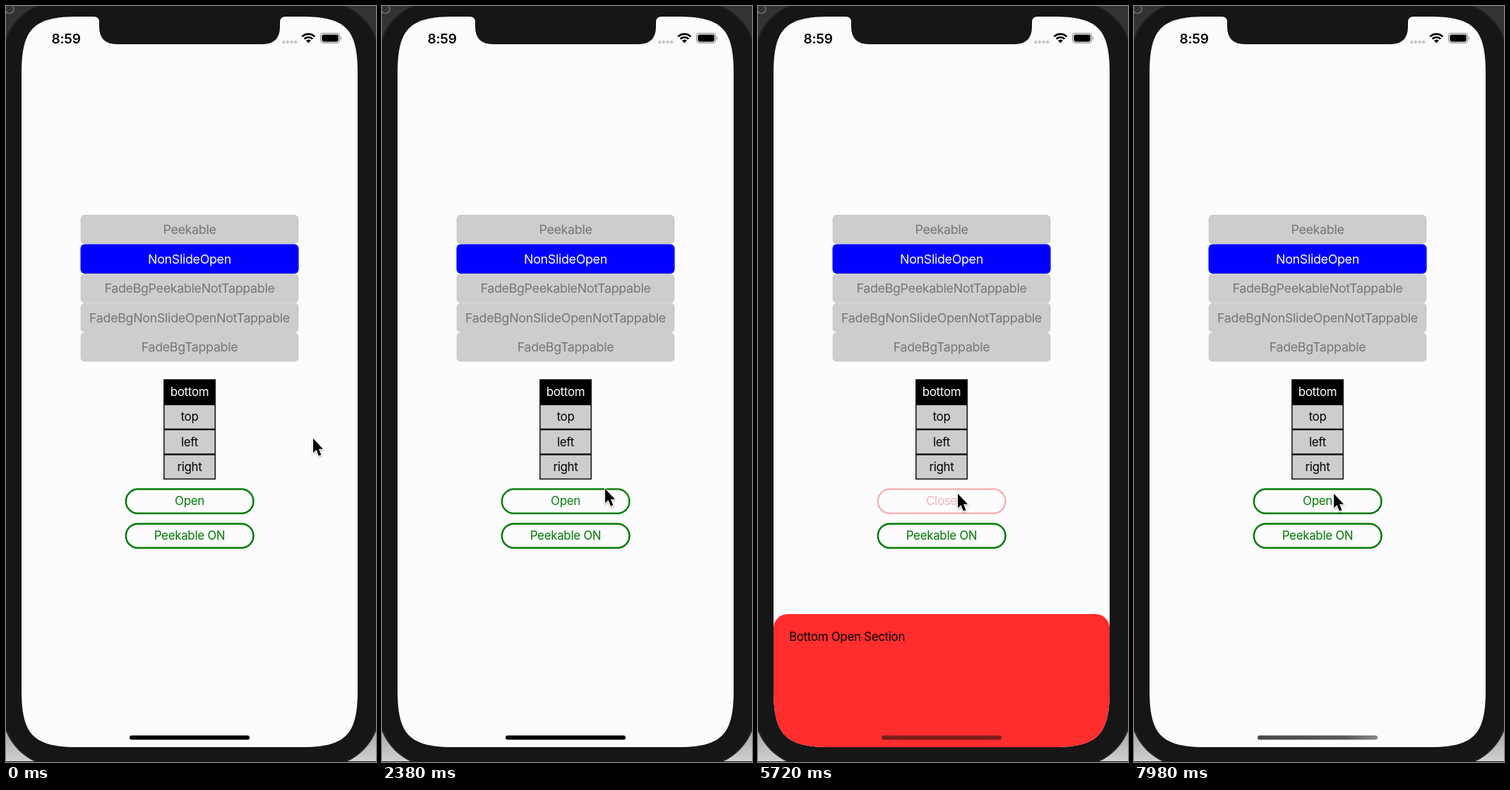
Animation, 524 px wide and 1068 px high, one loop 8 s. Source, as an HTML page:

```html
<!DOCTYPE html>
<html lang="en">
<head>
<meta charset="utf-8">
<title>Sliding panel demo</title>
<style>
  html, body { margin: 0; width: 100%; height: 100%; overflow: hidden; background: #161616; }
  svg { display: block; width: 524px; height: 1068px; font-family: Inter, Roboto, sans-serif; }
  .list { font-size: 17.8px; letter-spacing: -.28px; text-anchor: middle; }
  .small { font-size: 16.9px; letter-spacing: -.29px; }
  .mid { text-anchor: middle; }
  .clock { font-size: 19px; font-weight: 600; letter-spacing: -.2px; }
</style>
</head>
<body>
<svg viewBox="0 0 524 1068">
  <defs>
    <path id="screen" d="M22 95C22 32 39 15 102 15H418C481 15 498 32 498 95V967C498 1030 481 1047 418 1047H102C39 1047 22 1030 22 967Z"/>
    <clipPath id="clip"><use href="#screen"/></clipPath>
    <linearGradient id="desk" x2="0" y2="1">
      <stop offset="0" stop-color="#8e8e8e"/>
      <stop offset="1" stop-color="#d2d2d2"/>
    </linearGradient>
    <linearGradient id="fade">
      <stop offset="0" stop-color="#484848"/>
      <stop offset=".75" stop-color="#5a5a5a"/>
      <stop offset="1" stop-color="#888"/>
    </linearGradient>
    <filter id="shadow" x="-50%" y="-50%" width="200%" height="200%">
      <feDropShadow dx="0" dy="1.5" stdDeviation="1.3" flood-opacity=".35"/>
    </filter>
  </defs>

  <!-- desktop and phone body -->
  <rect width="524" height="534" fill="#333335"/>
  <rect y="1000" width="524" height="68" fill="url(#desk)"/>
  <path d="M10 1A6 6 0 1 1 0 1" fill="none" stroke="#777" stroke-width="1.5"/>
  <rect x="-5" y="-6" width="534" height="1080" rx="80" fill="#161616" stroke="#242425" stroke-width="2"/>
  <rect y="1067" width="524" height="1" fill="#161616"/>
  <use href="#screen" fill="#fcfcfe"/>
  <path d="M124 14V15Q132 15 132 23V29Q132 54 157 54H363Q388 54 388 29V23Q388 15 396 15V14Z" fill="#161616"/>

  <!-- status bar -->
  <text class="clock" x="64.5" y="52.5">8:59</text>
  <g id="dots" fill="#c6c6c6"></g>
  <g transform="translate(428.3 52.3)">
    <path d="M-8.9-8.9A12.6 12.6 0 0 1 8.9-8.9M-5.8-5.8A8.2 8.2 0 0 1 5.8-5.8" fill="none" stroke="#000" stroke-width="2.7"/>
    <path d="M0 0L-3.4-3.4A4.8 4.8 0 0 1 3.4-3.4Z"/>
  </g>
  <rect x="445.6" y="38.6" width="27" height="13.6" rx="4" fill="none" stroke="#8a8a8a" stroke-width="1.2"/>
  <rect x="447.4" y="40.4" width="23.4" height="10" rx="2.4"/>
  <path d="M474 43Q476 45.4 474 48Z" fill="#8a8a8a"/>

  <!-- app -->
  <g id="modes"></g>
  <g id="sides"></g>
  <g id="toggle">
    <rect x="169.8" y="682.6" width="180.6" height="34.2" rx="17.1" fill="none" stroke-width="2.5"/>
    <text class="small mid" x="260" y="705.4" stroke="none"></text>
  </g>
  <rect x="169.8" y="731.4" width="180.6" height="34.2" rx="17.1" fill="none" stroke="#007a00" stroke-width="2.5"/>
  <text class="small mid" x="260" y="754.2" fill="#007a00">Peekable ON</text>

  <g clip-path="url(#clip)">
    <g id="panel">
      <rect x="22" width="476" height="330" rx="20" fill="#ff2d2d"/>
      <text class="small" x="44" y="38">Bottom Open Section</text>
    </g>
  </g>
  <rect class="bar" x="175" y="1030.5" width="170" height="6" rx="3" fill="#000"/>
  <rect class="bar" x="175" y="1030.5" width="170" height="6" rx="3" fill="#7d1c1c"/>
  <rect class="bar" x="175" y="1030.5" width="170" height="6" rx="3" fill="url(#fade)"/>

  <g id="cursor" filter="url(#shadow)">
    <path d="M0 0V20.3L4.5 16.1L8 24.4L11.4 23L7.9 14.8H14Z" fill="#000" stroke="#fff" stroke-width="1.6" paint-order="stroke"/>
  </g>
</svg>

<script>
const LOOP = 8000, PANEL_OPEN = 754, PANEL_SHUT = 1047;
const $ = (q) => document.querySelector(q);
const bars = document.querySelectorAll('.bar');

function add(parent, tag, attrs, text = '') {
  const el = document.createElementNS('http://www.w3.org/2000/svg', tag);
  for (const k in attrs) el.setAttribute(k, attrs[k]);
  el.textContent = text;
  parent.append(el);
}

for (let i = 0; i < 4; i++) add($('#dots'), 'circle', { cx: 393.3 + i * 5.6, cy: 51, r: 2.2 });

['Peekable', 'NonSlideOpen', 'FadeBgPeekableNotTappable', 'FadeBgNonSlideOpenNotTappable', 'FadeBgTappable']
  .forEach((name, i) => {
    const y = 295 + i * 41.5, on = i === 1;
    add($('#modes'), 'rect', { x: 105.5, y, width: 309, height: 41.5, rx: 6, fill: on ? '#0000ff' : '#cdcdcd' });
    add($('#modes'), 'text', { class: 'list', x: 260, y: y + 27.2, fill: on ? '#fff' : '#757575' }, name);
  });

['bottom', 'top', 'left', 'right'].forEach((name, i) => {
  const y = 527.6 + i * 35.3, on = i === 0;
  add($('#sides'), 'rect', {
    x: 223.8, y: y + .4, width: 72.4, height: 34.3,
    fill: on ? '#000' : '#cdcdcd', stroke: '#000', 'stroke-width': 1.4
  });
  add($('#sides'), 'text', { class: 'small mid', x: 260, y: y + 23.4, fill: on ? '#fff' : '#000' }, name);
});

const ease = (p) => p < .5 ? 2 * p * p : 1 - 2 * (1 - p) ** 2;

// Steps are [time, value] pairs, eased in between.
function at(steps, t) {
  const n = steps.findIndex((s) => s[0] > t);
  if (n === 0) return steps[0][1];
  if (n < 0) return steps[steps.length - 1][1];
  const [t0, a] = steps[n - 1], [t1, b] = steps[n];
  return a + (b - a) * ease((t - t0) / (t1 - t0));
}

const OPEN_AT = 2450, CLOSE_AT = 5594, SLIDE = 300;
const OPENED = OPEN_AT + SLIDE, CLOSED = CLOSE_AT + SLIDE;
const press = (t) => [[t - 94, 1], [t + 56, .2], [t + 66, .2], [t + 316, 1]];

const tracks = {
  x: [[400, 435], [1500, 316], [3500, 316], [4200, 283]],
  y: [[400, 611], [1500, 682], [3500, 682], [4200, 689]],
  panel: [[OPEN_AT, PANEL_SHUT], [OPENED, PANEL_OPEN], [CLOSE_AT, PANEL_OPEN], [CLOSED, PANEL_SHUT]],
  touch: [...press(OPEN_AT), ...press(CLOSE_AT)],
  redBar: [[OPENED - 150, 0], [OPENED + 150, 1]],
  greyBar: [[CLOSED, 0], [CLOSED + 300, 1]]
};

function draw(t) {
  const v = (name) => at(tracks[name], t);
  const open = t >= OPENED && t < CLOSED;
  const toggle = $('#toggle'), label = $('#toggle text');
  const color = open ? '#f20505' : '#007a00';
  toggle.setAttribute('stroke', color);
  toggle.setAttribute('fill', color);
  toggle.setAttribute('opacity', v('touch'));
  label.textContent = open ? 'Close' : 'Open';
  $('#panel').setAttribute('transform', `translate(0 ${v('panel')})`);
  $('#cursor').setAttribute('transform', `translate(${v('x')} ${v('y')})`);
  const grey = v('greyBar');
  bars[0].setAttribute('opacity', grey < 1 ? 1 - v('redBar') : 0);
  bars[1].setAttribute('opacity', grey < 1 ? v('redBar') : 0);
  bars[2].setAttribute('opacity', grey);
}

const start = performance.now();
function tick() {
  draw((performance.now() - start) % LOOP);
  requestAnimationFrame(tick);
}
tick();
</script>
</body>
</html>
```
